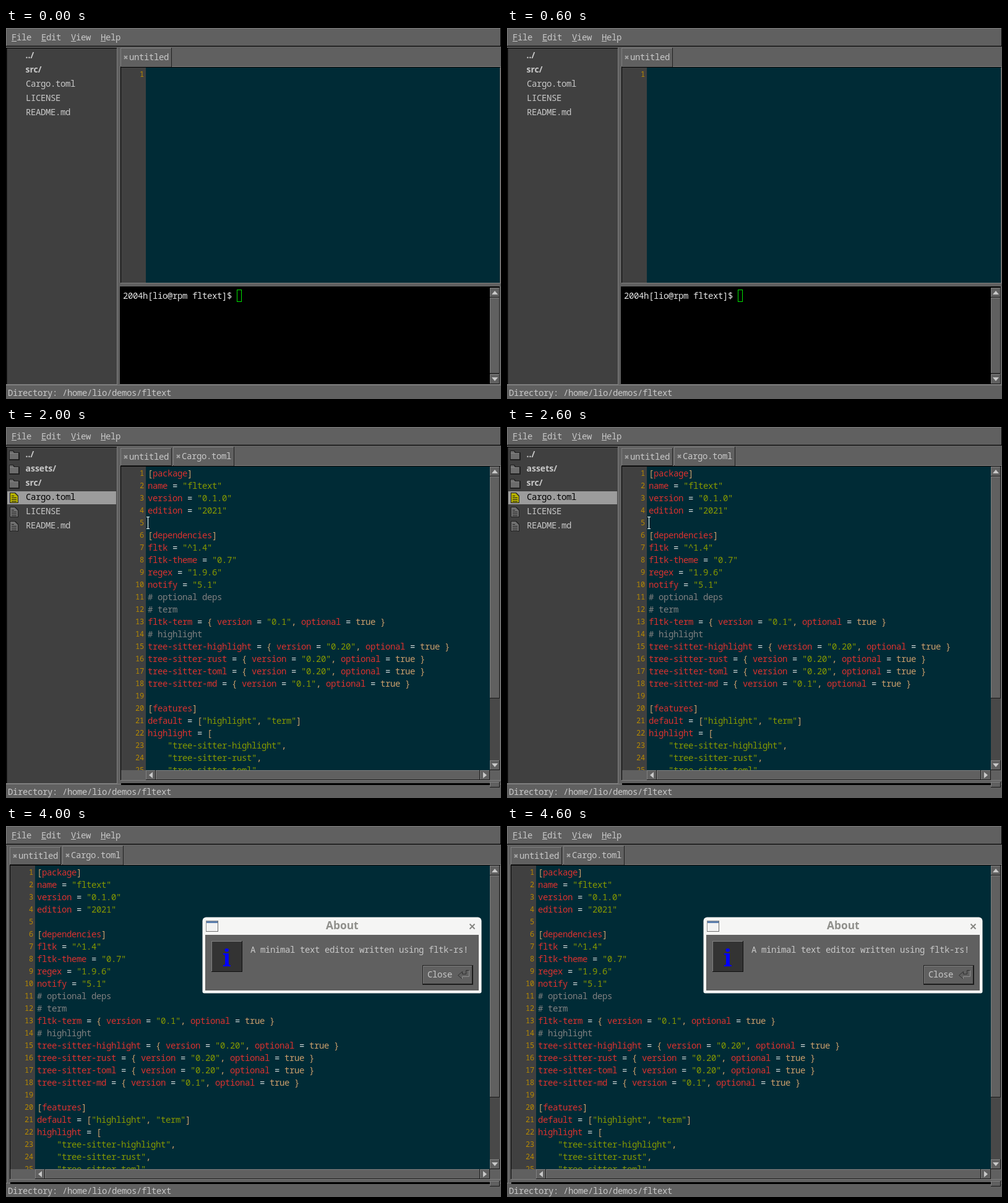
An HTML page with a canvas that plays this animation: 800 by 600 pixels, repeating every 5000 ms.

```html
<!DOCTYPE html>
<html lang="en">
<head>
<meta charset="utf-8">
<title>Text editor</title>
<style>
html, body { margin: 0; width: 100%; height: 100%; overflow: hidden; background: #606060; }
canvas { display: block; }
</style>
</head>
<body>
<canvas id="stage" width="800" height="600"></canvas>
<script>
const ctx = document.getElementById('stage').getContext('2d');
const MONO = '"Noto Sans Mono", "DejaVu Sans Mono", monospace';
const SANS = '"Noto Sans", "Open Sans", sans-serif';
const PANEL = '#606060', DARK = '#404040', LIGHT = '#808080', TEXT = '#c8c8c8';
const RED = '#dc322f', GREEN = '#859900', TAN = '#cb9f6c', GREY = '#808080', PALE = '#d8dede';

const optional = (name, version) => `${name} = { version = "${version}", optional = true }`;
const CODE = [
  '[package]', 'name = "fltext"', 'version = "0.1.0"', 'edition = "2021"', '',
  '[dependencies]', 'fltk = "^1.4"', 'fltk-theme = "0.7"', 'regex = "1.9.6"', 'notify = "5.1"',
  '# optional deps', '# term', optional('fltk-term', '0.1'),
  '# highlight', optional('tree-sitter-highlight', '0.20'), optional('tree-sitter-rust', '0.20'),
  optional('tree-sitter-toml', '0.20'), optional('tree-sitter-md', '0.1'), '',
  '[features]', 'default = ["highlight", "term"]', 'highlight = [',
  '    "tree-sitter-highlight",', '    "tree-sitter-rust",', '    "tree-sitter-toml",'
];

function rect(x, y, w, h, color) {
  ctx.fillStyle = color;
  ctx.fillRect(x, y, w, h);
}

// Box with a one-pixel bevel
function box(x, y, w, h, fill, topLeft, bottomRight) {
  rect(x, y, w, h, bottomRight);
  rect(x, y, w - 1, h - 1, topLeft);
  rect(x + 1, y + 1, w - 2, h - 2, fill);
}
const raised = (x, y, w, h) => box(x, y, w, h, PANEL, LIGHT, '#181818');
const sunken = (x, y, w, h, fill) => box(x, y, w, h, fill, '#000', LIGHT);

function path(points, color, width) {
  ctx.beginPath();
  points.forEach(([x, y]) => ctx.lineTo(x, y));
  if (width) {
    ctx.strokeStyle = color;
    ctx.lineWidth = width;
    ctx.stroke();
  } else {
    ctx.fillStyle = color;
    ctx.fill();
  }
}

function label(text, x, y, color, font) {
  ctx.font = font;
  ctx.fillStyle = color;
  ctx.fillText(text, x, y);
}

// Fixed-pitch text on a whole-pixel character grid
function mono(text, x, y, color = TEXT, size = 14) {
  const pitch = Math.floor(size * 0.6);
  [...text].forEach((ch, i) => label(ch, x + i * pitch, y, color, `${size}px ${MONO}`));
}

function cross(x, y, size, color) {
  path([[x, y], [x + size, y + size]], color, 2);
  path([[x + size, y], [x, y + size]], color, 2);
}

function arrow(x, y, dx, dy) {
  path([
    [x + dx * 3 - dy * 5, y + dy * 3 - dx * 5],
    [x + dx * 3 + dy * 5, y + dy * 3 + dx * 5],
    [x - dx * 3, y - dy * 3]
  ].map(([a, b]) => [2 * x - a, 2 * y - b]).map(([a, b]) => [a, b]), TEXT);
}

function vScroll(y, bottom, thumbEnd) {
  rect(782, y, 16, bottom - y, '#484848');
  raised(782, y, 16, 16);
  raised(782, y + 16, 16, thumbEnd - y - 16);
  raised(782, bottom - 16, 16, 16);
  arrow(790, y + 8, 0, -1);
  arrow(790, bottom - 8, 0, 1);
}

function hScroll(x, y) {
  raised(x, y, 16, 16);
  raised(x + 16, y, 766 - x - 16, 16);
  raised(766, y, 16, 16);
  arrow(x + 8, y + 8, -1, 0);
  arrow(774, y + 8, 1, 0);
}

function folderIcon(y) {
  path([[5, y + 1], [12, y + 1], [14, y + 4], [22, y + 4], [22, y + 17], [5, y + 17]], '#202020');
  path([[6, y + 2], [11, y + 2], [13, y + 5], [20, y + 5], [20, y + 15], [6, y + 15]], '#6c6c6c');
  rect(6, y + 5, 14, 1, '#858585');
}

function fileIcon(y, selected) {
  path([[6, y], [15, y], [20, y + 5], [20, y + 17], [6, y + 17]], '#202020');
  path([[7, y + 1], [14, y + 1], [19, y + 6], [19, y + 16], [7, y + 16]], selected ? '#b5b000' : '#707070');
  for (let i = 0; i < 4; i++) rect(9, y + 5 + i * 3, i ? 8 : 4, 1, '#202020');
}

function sidebar(opened) {
  sunken(0, 32, 180, 545, DARK);
  rect(1, 33, 1, 543, '#202020');
  const names = ['../', ...(opened ? ['assets/'] : []), 'src/', 'Cargo.toml', 'LICENSE', 'README.md'];
  names.forEach((name, i) => {
    const y = 49 + i * 23;
    const isDir = name.endsWith('/');
    const selected = opened && name === 'Cargo.toml';
    if (selected) rect(2, y - 14, 176, 21, '#9c9c9c');
    if (opened) isDir ? folderIcon(y - 12) : fileIcon(y - 12, selected);
    if (isDir) label(name, 31.5, y, TEXT, `bold 14px ${SANS}`);
    else mono(name, 32, y, selected ? '#000' : TEXT);
  });
}

function tab(x, name, active) {
  const top = active ? 32 : 34, w = name.length * 8 + 19;
  box(x, top, w, 63 - top, PANEL, LIGHT, '#202020');
  if (active) rect(x + 1, 62, w - 2, 1, PANEL);
  const y = active ? 52 : 53;
  cross(x + 6, y - 7, 5, '#a4a4a4');
  mono(name, x + 14, y);
}

function codeLine(line, x, y) {
  if (line[0] === '#') return mono(line, x, y, GREY);
  for (const { 0: token, index } of line.matchAll(/"[^"]*"|[\w-]+|[^\s\w]/g)) {
    const color = token[0] === '"' ? GREEN
      : token === '=' ? PALE
      : token === 'true' || !/\w/.test(token) ? TAN : RED;
    mono(token, x + index * 8, y, color);
  }
}

function editor(left, bottom, opened, thumbEnd, caret) {
  rect(left - 1, 62, 801 - left, 1, LIGHT);
  tab(left, 'untitled', !opened);
  if (opened) tab(left + 85, 'Cargo.toml', true);
  sunken(left, 63, 800 - left, bottom - 62, PANEL);

  const x = left + 41;
  const right = opened ? 782 : 798;
  const end = opened ? bottom - 16 : bottom;
  ctx.save();
  ctx.beginPath();
  ctx.rect(left + 1, 64, right - left - 1, end - 64);
  ctx.clip();
  rect(left + 1, 64, 40, end - 64, DARK);
  rect(x, 64, right - x, end - 64, '#002b36');
  (opened ? CODE : ['']).forEach((line, i) => {
    const number = String(i + 1);
    mono(number, left + 38 - number.length * 7, 79 + i * 20, '#b58900', 12);
    codeLine(line, x + 3, 80 + i * 20);
  });
  if (caret) {
    rect(x + 3, 146, 1, 18, '#fff');
    rect(x + 1, 145, 5, 1, '#fff');
    rect(x + 1, 164, 5, 1, '#fff');
  }
  ctx.restore();

  if (opened) {
    vScroll(64, end, thumbEnd);
    hScroll(x, end);
  }
}

function terminal() {
  sunken(184, 418, 615, 159, '#000');
  vScroll(420, 576, 559);
  mono('2004h[lio@rpm fltext]$', 189, 438, '#e4e4e4');
  ctx.strokeStyle = '#00e000';
  ctx.lineWidth = 1;
  ctx.strokeRect(373.5, 423.5, 7, 19);
}

function about() {
  ctx.fillStyle = '#f5f5f4';
  ctx.beginPath();
  ctx.roundRect(317.5, 147.5, 451, 123, [6, 6, 3, 3]);
  ctx.fill();
  rect(322, 176, 442, 90, PANEL);
  box(323, 153, 20, 18, '#f2f2f2', '#909090', '#707070');
  rect(324, 154, 18, 3, '#5d7fae');
  label('About', 517, 167, '#8f8f8b', `bold 17.33px ${SANS}`);
  cross(749.5, 158.5, 8, '#858581');

  box(332, 186, 50, 50, '#333', LIGHT, '#101010');
  ctx.textAlign = 'center';
  label('i', 357, 227, '#00f', 'bold 38px "Noto Serif", "DejaVu Serif", serif');
  ctx.textAlign = 'left';
  mono('A minimal text editor written using fltk-rs!', 395, 205);

  rect(673, 225, 82, 32, '#202020');
  raised(674, 226, 80, 30);
  mono('Close', 681, 245);
  path([
    [730.5, 241.5], [737.5, 235.5], [737.5, 239.5], [743.5, 239.5], [743.5, 233.5],
    [748.5, 233.5], [748.5, 243.5], [737.5, 243.5], [737.5, 247.5], [730.5, 241.5]
  ], '#303030', 1);
  path([[737.5, 247.5], [737.5, 243.5], [748.5, 243.5], [748.5, 233.5]], '#909090', 1);
}

function draw(step) {
  const opened = step > 0, maximized = step > 1, wide = step > 2;
  rect(0, 0, 800, 600, PANEL);
  box(0, 0, 800, 30, PANEL, LIGHT, '#000');
  rect(1, 28, 798, 1, '#505050');
  ['File', 'Edit', 'View', 'Help'].forEach((name, i) => {
    mono(name, 9 + i * 48, 20);
    rect(9 + i * 48, 21, 8, 1, TEXT);
  });

  if (wide) {
    rect(0, 32, 1, 545, '#202020');
    rect(1, 32, 1, 545, LIGHT);
  } else sidebar(opened);

  const left = wide ? 6 : 185;
  editor(left, maximized ? 571 : 412, opened, maximized ? 439 : 239, step === 2 || step === 3);
  if (!maximized) terminal();

  rect(0, 577, 800, 1, LIGHT);
  if (maximized) {
    rect(left + 1, 576, 781 - left, 3, '#000');
    raised(782, 574, 16, 9);
  }
  mono('Directory: /home/lio/demos/fltext', 3, 595);
  if (step === 4) about();
}

const start = performance.now();
function tick() {
  draw(Math.floor((performance.now() - start) % 5000 / 1000));
  requestAnimationFrame(tick);
}
tick();
</script>
</body>
</html>
```
